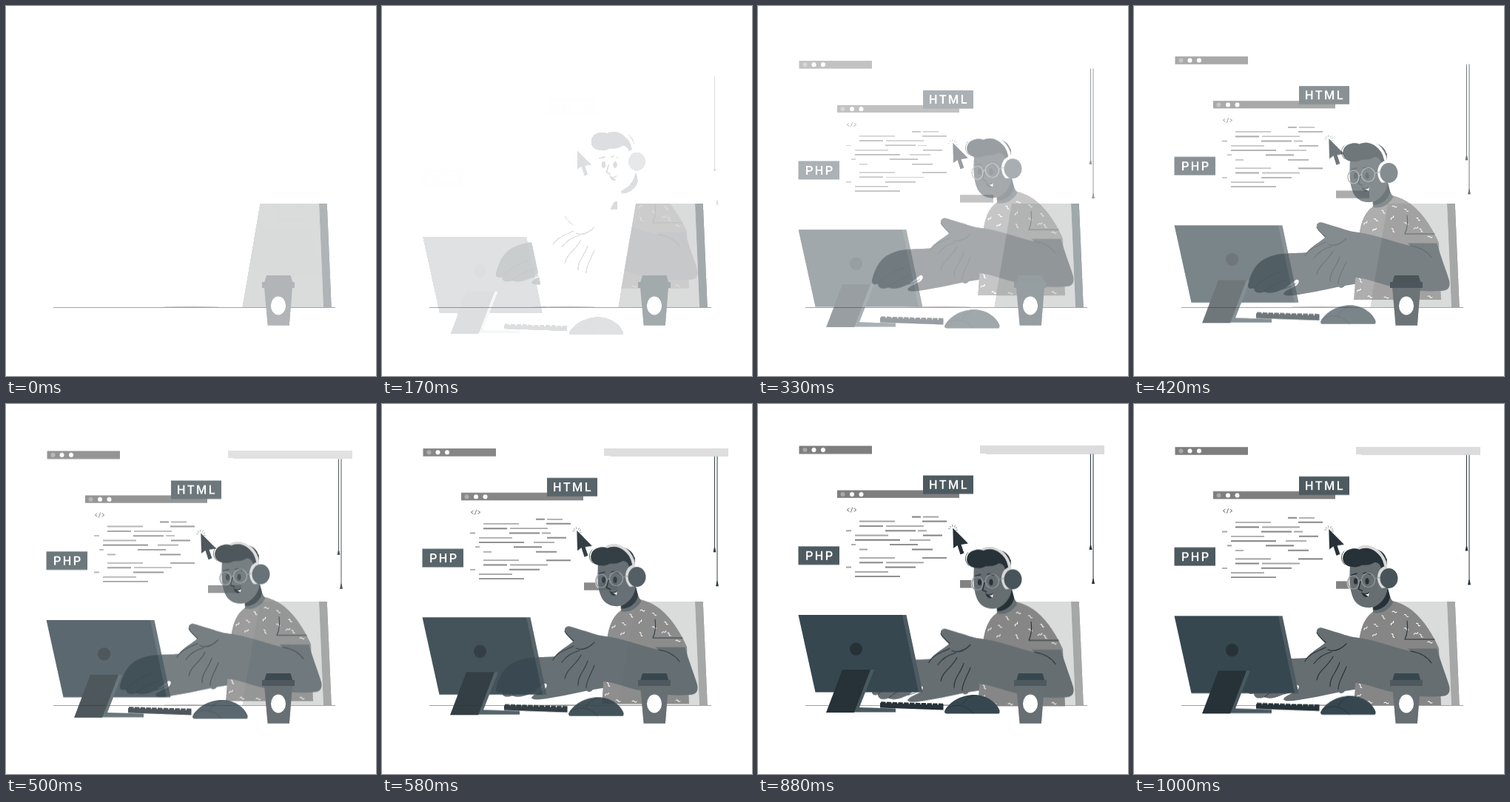
Recreate the animation shown at these times as an HTML page. Size 500x500 px, loop 1040 ms.

```html
<!DOCTYPE html>
<html lang="en">
<head>
<meta charset="utf-8">
<title>Developer at a desk</title>
<style>
  html, body { margin: 0; width: 100%; height: 100%; overflow: hidden; background: #fff; }
  svg { display: block; width: 100vw; height: 100vh; }

  .up, .down { animation: slide 1040ms infinite; }
  .up { --from: 30.2px; --rest: .4px; }
  .down { --from: -29.85px; --rest: 0px; }
  @keyframes slide {
    0% { opacity: .005; transform: translateY(var(--from)); animation-timing-function: cubic-bezier(.345, .09, .5, 1.367); }
    92.3%, 100% { opacity: 1; transform: translateY(var(--rest)); }
  }

  .lid { animation: lid 1040ms infinite; }
  .rim { animation: rim 1040ms infinite; }
  .cup { animation: cup 1040ms infinite; }
  .side { animation: side 1040ms infinite; }
  .skin { animation: skin 1040ms infinite; }
  @keyframes lid {
    0% { fill: #b1b5b8; } 16.3% { fill: #a3aaac; } 31.7% { fill: #969ea1; }
    40.4% { fill: #4a5459; } 55.8%, 100% { fill: #37474f; }
  }
  @keyframes rim {
    0% { fill: #b1b5b8; } 16.3% { fill: #a3aaac; } 31.7% { fill: #969ea1; }
    40.4% { fill: #4c565b; } 55.8%, 100% { fill: #4e595e; }
  }
  @keyframes cup {
    0% { fill: #b1b5b8; } 16.3% { fill: #a3aaac; } 31.7% { fill: #969ea1; }
    40.4% { fill: #6c7478; } 55.8%, 100% { fill: #676f73; }
  }
  @keyframes side {
    0% { fill: #b0b4b6; } 16.3% { fill: #a3aaac; } 31.7% { fill: #9fa8ab; }
    40.4%, 100% { fill: #a6a7a7; }
  }
  @keyframes skin {
    0%, 16.3% { fill: #646c70; } 31.7% { fill: #40494e; } 40.4% { fill: #485258; }
    55.8% { fill: #5d676c; } 68%, 100% { fill: #666e72; }
  }

  .label { font: 500 16.3px Roboto, sans-serif; letter-spacing: 2.4px; fill: #fff; }
  .ink { fill: #263238; }
  .slate { fill: #37474f; }
  .pale { fill: #d8d8d8; }
  .line { fill: none; stroke: #263238; stroke-linecap: round; stroke-linejoin: round; }
  .glasses { fill: none; stroke: #949a9c; stroke-width: 1.2; }
</style>
</head>
<body>
<svg viewBox="0 0 500 500">
  <defs>
    <!-- Faint tints drop out to white -->
    <filter id="key" x="0" y="0" width="500" height="500" filterUnits="userSpaceOnUse" color-interpolation-filters="sRGB">
      <feColorMatrix values="1 0 0 0 0  0 1 0 0 0  0 0 1 0 0  -66.7 -66.7 -66.7 0 178.7"/>
    </filter>
    <path id="wave" d="M-3 .4Q-1.5 -1.600 0 0T3 -.4" fill="none" stroke="#fff" stroke-linecap="round"/>
  </defs>

  <g filter="url(#key)">
    <rect width="500" height="500" fill="#fff"/>

    <path d="M64 407.5H445" stroke="#a2a2a2"/>
    <path d="M198 407Q250 405.4 302 407Z" fill="#a0a0a0"/>
    <path d="M343 267H423L429 407H319Z" fill="#dadbdb"/>
    <path class="side" d="M423 267H434L440 407.500H429Z"/>

    <g class="up">
      <path d="M300 57H468V69H308L306 68H300Z" fill="#dcdcdc"/>
      <path class="line" d="M449.500 69V194M453 69V240"/>
      <path class="ink" d="M449 191H450L451.500 198H447.500ZM452.500 237H453.500L455 244H451Z"/>
      <rect x="273" y="239" width="45" height="10.500" fill="#828282"/>
    </g>

    <g class="up">
      <g fill="#7e7e7e">
        <rect x="55.500" y="57.500" width="98.500" height="11"/>
        <rect x="107" y="117.500" width="165" height="10.500"/>
      </g>
      <g fill="#fff">
        <circle cx="63.500" cy="63" r="3" fill="#a9a9a9"/>
        <circle cx="75.500" cy="63" r="3"/>
        <circle cx="88" cy="63" r="3"/>
        <circle cx="114.500" cy="123" r="3" fill="#a9a9a9"/>
        <circle cx="127" cy="123" r="3"/>
        <circle cx="139.500" cy="123" r="3"/>
      </g>
      <path d="M123.500 141.500L120.500 144L123.500 146.500M127.800 140.500L125.200 147.500M129.500 141.500L132.500 144L129.500 146.500" fill="none" stroke="#7e7e7e" stroke-width="1.100"/>
      <g id="code"></g>
      <g fill="#4d5a60">
        <rect x="223" y="97.500" width="68" height="25"/>
        <rect x="54.500" y="193.300" width="55.500" height="25"/>
      </g>
      <text class="label" x="231" y="116">HTML</text>
      <text class="label" x="64" y="212">PHP</text>
    </g>

    <g class="down">
      <!-- far arm -->
      <path class="skin" d="M305 338L262 336L235 343C215 345 195 342 178 351C165 357 158 370 154 386C153 392 158 393 162 391C162 398 170 399 176 396C184 400 194 396 203 392L219 380C224 379 224 384 219 388C212 392 203 395 202 399C204 404 222 400 240 397C262 393 285 387 305 385Z"/>
      <path class="line" stroke-width=".8" d="M162 391Q178 375 197 369M176 396Q190 384 207 380M203 392Q212 390 219 385"/>
      <!-- shirt -->
      <path d="M324 280C311 289 305 302 302.500 335L297 407H415L412 330C404 312 392 292 376 279C366 271 357 268 349 266C344 276 334 281 324 280Z" fill="#868686"/>
      <g id="waves"></g>
      <!-- neck and face -->
      <path class="skin" d="M322 268L342 245L346 260C348 266 351 267 350 269C343 280 333 284 323 282Z"/>
      <path class="ink" d="M323 275C334 270 341 261 343 249L346 261C344 272 333 279 324 278.500Z"/>
      <path class="pale" d="M293 231C286 233 286 249 293 251Z"/>
      <path class="skin" d="M292 216C291 235 291 253 297 264C302 273 311 276 320 275C331 273 339 263 342 250V209L310 203Z"/>
      <!-- hair and headphones -->
      <path class="ink" d="M295 220C285 220 280 212 283 204C286 196 297 194 304 196C315 192 331 194 338 203C342 208 342 214 339 218L334 224C334 217 330 214 325 214C318 219 312 217 307 218C304 220 299 221 295 220Z"/>
      <path class="line" stroke-width=".8" d="M285 217C279 212 279 204 284 199"/>
      <path d="M303 195C320 188 340 200 341 226" fill="none" stroke="#d8d8d8" stroke-width="4"/>
      <path class="pale" d="M340 219C328 221 325 240 335 249L342 248Z"/>
      <ellipse cx="344.500" cy="235.500" rx="12" ry="13.500" fill="#47545a"/>
      <!-- features -->
      <g class="ink">
        <ellipse cx="299.500" cy="239.500" rx="2.600" ry="4.300"/>
        <ellipse cx="315" cy="239.500" rx="2.600" ry="4.300"/>
        <path d="M307 254Q312 258 318 254Q318 261 313 261Q309 260 307 254Z"/>
      </g>
      <path class="line" stroke-width="1.500" d="M294 231L301 229M310 229Q314 227 319 230M306 240L303.500 250L308.500 252.500"/>
      <path d="M312 257Q316 258 318 255L317 260Z" fill="#fff"/>
      <g class="glasses">
        <ellipse cx="296.500" cy="241" rx="7.500" ry="9"/>
        <ellipse cx="316.500" cy="238" rx="9" ry="9.500"/>
        <path d="M304 240Q306 237 308 238M325.500 236L333 234"/>
      </g>
      <!-- near arm and hand -->
      <path class="skin" d="M367 327L409 329C414 348 422 367 426 381C428 391 424 395 414 395C385 397 350 391 323 382C311 378 301 377 294 376L285 388C281 393 275 391 276 386C270 391 264 388 265 382C259 388 248 381 247 373C250 368 253 362 258 356L248 350C240 354 231 353 231 348C234 338 248 331 258 323L249 313C244 307 248 300 256 303L272 308C280 310 289 314 297 315C325 318 350 329 373 334Z"/>
      <g class="line" stroke-width="1.100">
        <path d="M231 348C235 338 249 334 259 329M243 351C250 341 259 337 267 335M247 373C249 360 263 354 269 341M265 382C264 370 274 362 278 349M276 386C275 377 283 366 287 355M247 309Q251 316 259 322"/>
        <path d="M374 334C386 336 396 341 402 350M262 332C272 336 280 331 287 324"/>
      </g>
      <path d="M366 318L411 328L410 330.500H367Z" fill="#868686"/>
      <path class="line" stroke-width="1.100" d="M369 293Q371 307 366 318H406"/>
    </g>

    <g class="up">
      <path class="ink" d="M263.300 168.500L264 196L269.500 192L273.500 204.500L278.500 202.500L274.500 191L284 189.500Z"/>
      <g id="rays" stroke="#8d9699" stroke-width="1"></g>
    </g>

    <g class="up">
      <path class="slate" d="M54.500 286H196L217.500 390.500H77.500Z"/>
      <path d="M195 286H200.500L222.500 390.500H217Z" fill="#4d5b62"/>
      <ellipse class="ink" cx="132.500" cy="332" rx="8.500" ry="8.800"/>
      <path d="M150 360H157L137 411L186 412.500V417.500H126Z" fill="#495960"/>
      <path class="ink" d="M114 360H152L130 418H92Z"/>
    </g>

    <g class="up">
      <path class="ink" d="M165 405L250.500 408V414.500L165 411.500Z"/>
      <path d="M166 404.800L250.500 407.300" stroke="#263238" stroke-width="3" stroke-dasharray="6.500 1.300"/>
      <path class="slate" d="M252 416C258 404 274 394 292 394C309 394 322 404 326.500 415V418Q326.500 419.500 324 419.500H255Q252 419.500 252 416Z"/>
      <path class="line" stroke-width=".8" d="M254 413C268 405 280 407 291 419M276 407Q280 399 292 394.500"/>
    </g>

    <path class="cup" d="M349 380H387L383 431.700H353.500Z"/>
    <path class="lid" d="M352 364H384.500L387.500 374H349Z"/>
    <rect class="rim" x="346" y="373" width="44" height="8"/>
    <ellipse cx="368" cy="405" rx="10" ry="12.500" fill="#fff"/>
  </g>
</svg>
<script>
  const fill = (id, parts) => { document.getElementById(id).innerHTML = parts.join(''); };

  // Each row: y, then "start-end" spans; * marks the darker ones
  const rows = `153.5 208-220* 223-244
    159.5 137-185 222-255*
    166 137-169* 173-224
    172.2 119-126 172-213* 216-228
    178.5 131-176 223-249*
    184.7 131-192* 205-233
    191 126-132 178-216*
    197.5 137-148 208-236*
    209 137-185 222-255*
    215.2 137-169* 173-224
    221.5 119-126 172-213*
    227.8 131-176
    234 131-192*`;
  fill('code', rows.split('\n').flatMap(row => {
    const [y, ...spans] = row.trim().split(' ');
    return spans.map(span => {
      const [a, b] = span.replace('*', '').split('-');
      const tone = span.endsWith('*') ? '#7d7d7d' : '#a0a0a0';
      return `<rect x="${a}" y="${y - 1}" width="${b - a}" height="2" fill="${tone}"/>`;
    });
  }));

  const waves = [
    [337, 288, 50], [352, 281, 10], [327, 299, 30], [349, 296, -50], [368, 286, 30],
    [384, 298, 40], [368, 304, 25], [325, 312, -30], [317, 324, 10], [313, 344, 40],
    [350, 313, 60], [388, 313, 50], [400, 322, 10], [313, 303, -40], [306, 381, 60],
    [304, 394, -30], [319, 403, 20], [341, 404, 10], [400, 403, 20], [381, 310, -20]
  ];
  fill('waves', waves.map(([x, y, turn]) =>
    `<use href="#wave" transform="translate(${x} ${y}) rotate(${turn})"/>`));

  fill('rays', [-170, -135, -100, -60, -25, 10].map(turn =>
    `<path d="M3.500 0H6.500" transform="translate(263.500 170.500) rotate(${turn})"/>`));
</script>
</body>
</html>
```
